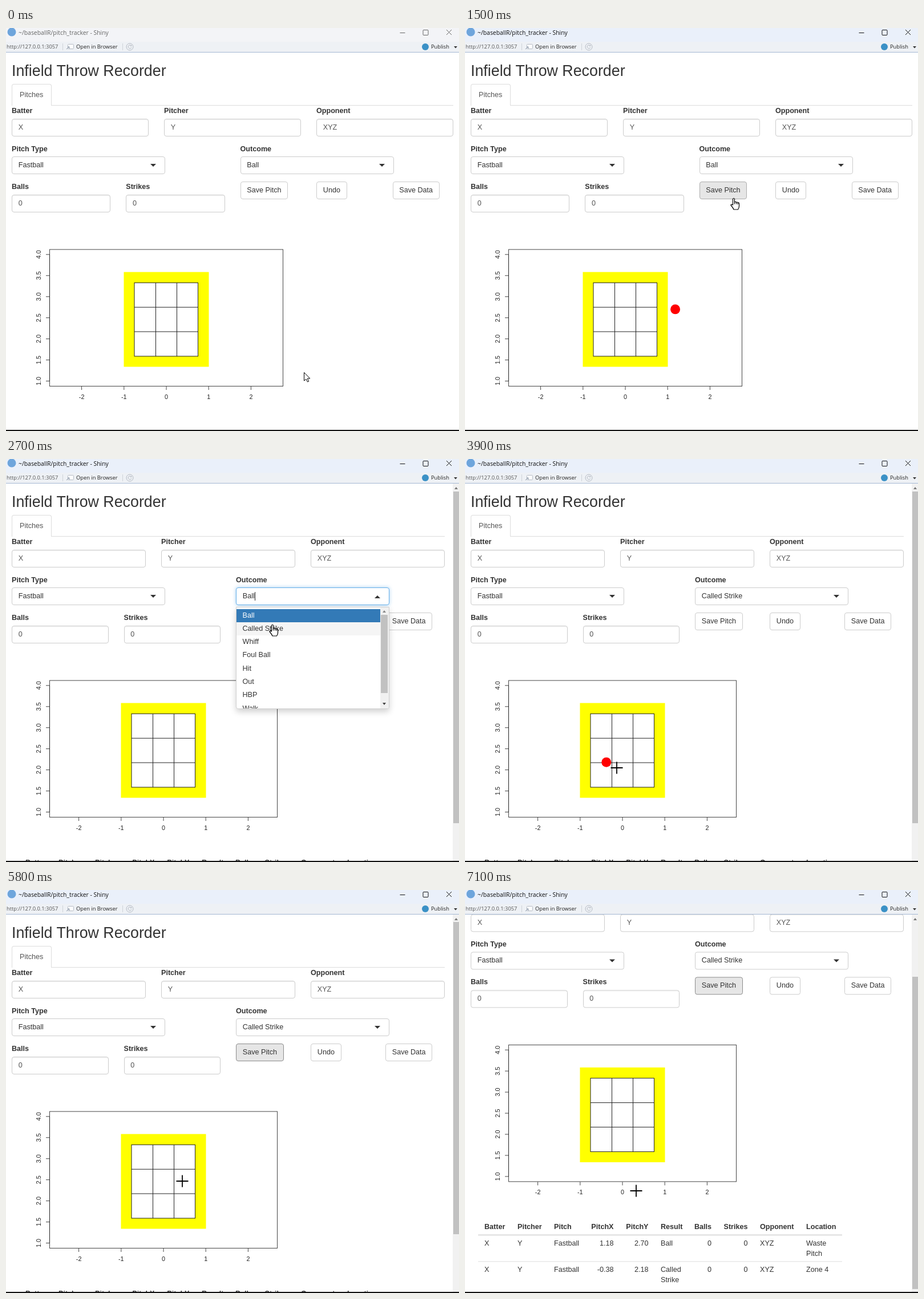
Animation of 794 by 706 pixels, one loop 7.2 s. Source, as an HTML page:

```html
<!DOCTYPE html>
<html lang="en">
<head>
<meta charset="utf-8">
<title>Pitch tracker</title>
<style>
  html, body { margin: 0; width: 100%; height: 100%; overflow: hidden; background: #fff; }
  #stage { position: relative; width: 794px; height: 706px; overflow: hidden; background: #fff; --w: 801px;
    font: 12.6px/18px "Liberation Sans", Arial, sans-serif; color: #333; }
  #stage.narrow { --w: 786px; }
  #stage div, #stage span, #stage svg { position: absolute; box-sizing: border-box; white-space: pre; }
  #stage svg { overflow: visible; }

  .bar { left: 0; width: 794px; font-family: "Open Sans", "Noto Sans", sans-serif; }
  #title { top: 0; height: 24px; background: #f3f4f7; color: #666; font-size: 10.4px; line-height: 16px; }
  .active #title { background: #eaf0fa; color: #111; }
  #tools { top: 24px; height: 19px; background: #eef1f5; border-bottom: 1px solid #a5b8d3;
    color: #222; font-size: 9.3px; line-height: 18px; }
  #view { left: 0; top: 43px; width: 794px; height: 661px; overflow: hidden; }
  #page { left: 0; top: -43px; width: 794px; height: 900px; }
  #floor { left: 0; top: 704px; width: 794px; height: 2px; background: #111; }

  #heading { left: 10px; top: 60px; font-size: 26.8px; line-height: 30px; }
  #tabline { left: 10px; top: 135px; width: calc(var(--w) - 27px); height: 1px; background: #ddd; }
  #tab { left: 10px; top: 98px; width: 70px; height: 38px; border: 1px solid #ddd; border-bottom: 0;
    border-radius: 4px 4px 0 0; background: #fff; color: #555; padding-left: 13px; line-height: 37px; }
  .col { left: calc(10px + var(--w) * var(--at)); }
  .label, .head { font-weight: bold; }
  .input, .select, .button { height: 31px; border: 1px solid #ccc; border-radius: 4px; padding: 0 10.8px; line-height: 29px; }
  .input { width: calc(var(--w) * var(--span) - 27px); color: #555; box-shadow: inset 0 1px 1px rgba(0,0,0,.06); }
  .select { width: 269px; background: #fff; }
  .select svg { right: 15px; top: 12px; }
  .select.open { border-color: #66afe9; box-shadow: 0 0 6px rgba(102,175,233,.6); }
  .select.open svg { transform: scaleY(-1); }
  .open #picked { border-right: 1px solid #222; line-height: 15px; top: 7px; }
  .button { top: 269px; background: #fff; }
  .button.hover { background: #e6e6e6; border-color: #adadad; }
  .button.focus { background: #e6e6e6; border-color: #8c8c8c; }
  .button.down { background: #d4d4d4; border-color: #8c8c8c; outline: 1px dashed #e0702a; outline-offset: -3px;
    box-shadow: inset 0 0 0 1px #d8c860, inset 0 3px 5px rgba(0,0,0,.12); }

  #list { left: 403px; top: 259px; width: 269px; height: 179px; overflow: hidden; z-index: 1; background: #fff;
    border: 1px solid #d0d0d0; border-radius: 0 0 4px 4px; box-shadow: 0 5px 11px rgba(0,0,0,.18); }
  .item { left: 0; width: 252px; height: 23.3px; padding-left: 10.5px; line-height: 23px; }
  .item.on { background: #337ab7; color: #fff; }
  .item.hover { background: #f5f5f5; }
  #listbar { left: 252px; top: 0; width: 15px; height: 178px; background: #f1f1f1; }
  #listthumb { left: 1px; top: 13px; width: 12px; height: 137px; background: #c1c1c1; }

  #table { left: 0; top: 0; }
  #table .right { transform: translateX(-100%); }
  .rule { left: 23px; width: 638px; background: #ddd; }
  #scroll { left: 783px; top: 0; width: 11px; height: 661px; background: #f1f1f1; }
  #thumb { left: 1px; width: 10px; background: #c1c1c1; }
  #stage .hide { display: none; }
</style>
</head>
<body>
<div id="stage">
  <div id="view">
    <div id="page">
      <div id="heading">Infield Throw Recorder</div>
      <div id="tabline"></div>
      <div id="tab">Pitches</div>
      <svg id="plot" width="520" height="680" style="left:0;top:0" font-size="10.8" text-anchor="middle" fill="none">
        <rect id="frame" x="76.5" y="388" height="239.5" stroke="#444"/>
        <g id="axes"></g>
      </svg>
      <div id="table"></div>
      <div id="list"></div>
    </div>
    <div id="scroll">
      <svg width="11" height="14" style="left:0;top:0"><path d="M3 10l3-4 3 4z" fill="#777"/></svg>
      <div id="thumb"></div>
    </div>
  </div>
  <div id="title" class="bar">
    <svg width="794" height="24" style="left:0;top:0" fill="none" stroke="currentColor">
      <circle cx="10" cy="7" r="7.5" fill="#6ea5dc" stroke="none"/>
      <path d="M690.5 8.5h9M732 3.5h7q1 0 1 1v7q0 1-1 1h-7q-1 0-1-1v-7q0-1 1-1zM772 3l9 9m0-9l-9 9"/>
    </svg>
    <span style="left:22px;top:0">~/baseballR/pitch_tracker - Shiny</span>
  </div>
  <div id="tools" class="bar">
    <svg width="794" height="18" style="left:0;top:0" fill="none" stroke="#b5bbc4">
      <path d="M99.5 3v12M204.5 3v12" stroke="#cfd4da"/>
      <rect x="108.5" y="4.5" width="10" height="8" rx="1" fill="#fff"/>
      <path d="M106 13l5-4m-3 0h3v3" stroke="#8a97a8"/>
      <circle cx="217" cy="9" r="6"/><path d="M219.5 7a3 3 0 1 0 .5 3m0-4.5v2h-2"/>
      <circle cx="735" cy="9" r="6" fill="#3b91c6" stroke="none"/>
      <path d="M785 8h6l-3 3.5z" fill="#333" stroke="none"/>
    </svg>
    <span style="left:1px;top:0;color:#555">http://127.0.0.1:3057</span>
    <span style="left:123px;top:0">Open in Browser</span>
    <span style="left:745px;top:0">Publish</span>
  </div>
  <div id="floor"></div>
  <svg id="cursor" width="24" height="24" style="left:0;top:0">
    <path id="arrow" d="M.5.5v14.5l3.5-3 2.5 5 2.2-1-2.4-5h4.5z" fill="#fff" stroke="#000"/>
    <path id="cross" d="M-10.5 0h21M0-10.5v21" stroke="#000" stroke-width="1.8"/>
    <path id="hand" d="M-1.5 12V1.5q1.5-2.5 3 0V7q1.5-1.2 3 .3 1.5-.8 2.7.6 2-.5 2.3 1.6V14q0 3-2 6H0q-1-3-5-7.5 0-2.5 3.5-.5zM1.5 7v3.5M4.5 7.5v3M7.2 8v3" fill="#fff" stroke="#000" stroke-width="1.2" stroke-linejoin="round"/>
  </svg>
</div>
<script>
const $ = id => document.getElementById(id);
const stage = $('stage'), page = $('page');

function add(parent, cls, text, style) {
  const el = document.createElement('div');
  el.className = cls;
  el.textContent = text;
  for (const k in style) el.style.setProperty(k, style[k]);
  return parent.appendChild(el);
}
const label = (text, at, y) => add(page, 'col label', text, { '--at': at, top: y + 'px' });

function input(name, value, at, y, span) {
  label(name, at, y);
  add(page, 'col input', value, { '--at': at, '--span': span, top: y + 22.5 + 'px' });
}
function select(name, at) {
  label(name, at, 202.5);
  const el = add(page, 'col select', '', { '--at': at, top: '225px' });
  el.innerHTML = '<span>Fastball</span><svg width="10" height="6"><path d="M0 0h10l-5 5z" fill="#333"/></svg>';
  return el;
}
const button = (text, at) => add(page, 'col button', text, { '--at': at });

['Batter|X', 'Pitcher|Y', 'Opponent|XYZ'].forEach((s, i) => input(...s.split('|'), i / 3, 136, 1 / 3));
input('Balls', '0', 0, 269, 1 / 4);
input('Strikes', '0', 1 / 4, 269, 1 / 4);
select('Pitch Type', 0);
const outcome = select('Outcome', 1 / 2);
const picked = outcome.firstChild;
picked.id = 'picked';
const save = button('Save Pitch', 1 / 2);
button('Undo', 2 / 3);
button('Save Data', 5 / 6);

// Outcome list
const list = $('list');
const items = ['Ball', 'Called Strike', 'Whiff', 'Foul Ball', 'Hit', 'Out', 'HBP', 'Walk'].map((s, i) =>
  add(list, 'item' + (i ? '' : ' on'), s, { top: 2.5 + i * 23.3 + 'px' }));
list.insertAdjacentHTML('beforeend', '<div id="listbar"><div id="listthumb"></div>' +
  '<svg width="15" height="178" style="left:0;top:0"><path d="M4 9l3-4 3 4z" fill="#888"/>' +
  '<path d="M4 167l3 4 3-4z" fill="#444"/></svg></div>');

// Strike zone plot: pixels per unit across and up
const px = v => 281 + v * 74.2, py = v => 618.5 - (v - 1) * 73.9;
let art = '<rect x="206.5" y="427.5" width="149" height="166" fill="#ff0"/>' +
  '<rect x="225" y="446.3" width="111.5" height="128.7" fill="#fff" stroke="#222"/>' +
  '<path d="M262.5 446.3V575M299.5 446.3V575M225 489.2h111.5M225 532h111.5" stroke="#222"/>';
for (let v = -2; v <= 2; v++)
  art += `<path d="M${px(v)} 628v6" stroke="#444"/><text x="${px(v)}" y="650" fill="#222">${v}</text>`;
$('axes').innerHTML = art + '<circle id="dot" r="8.5" fill="#f00"/>';
let side = '';
for (let v = 1; v <= 4; v += .5)
  side += `<path d="M70 ${py(v)}h6" stroke="#444"/>` +
    `<text transform="translate(61 ${py(v)}) rotate(-90)" fill="#222">${v.toFixed(1)}</text>`;
$('plot').insertAdjacentHTML('beforeend', `<g>${side}<path d="M76.5 ${py(1)}V${py(4)}" stroke="#222"/></g>`);

// Saved pitches; a negative column is a right edge
const table = $('table');
const cols = [34, 92, 156, -260.5, -321.5, 343, -432, -495.5, 517, 598];
const row = (cells, y, cls = '') => cells.split('|').map((s, i) =>
  add(table, cls + (cols[i] < 0 ? ' right' : ''), s, { top: y - 9 + 'px', left: Math.abs(cols[i]) + 'px' }));
const rule = (y, height) => add(table, 'rule', '', { top: y + 'px', height: height + 'px' });

row('Batter|Pitcher|Pitch|PitchX|PitchY|Result|Balls|Strikes|Opponent|Location', 706.6, 'head');
rule(720, 2);
row('X|Y|Fastball|1.18|2.70|Ball|0|0|XYZ|Waste\nPitch', 735.6);
const second = [rule(767, 1), ...row('X|Y|Fastball|-0.38|2.18|Called\nStrike|0|0|XYZ|Zone 4', 781.6)];

// Motion: [ms, value...]
const path = [[0, 522, 603], [500, 368, 493], [900, 368, 493], [1400, 471, 298], [1700, 471, 298],
  [2200, 540, 243], [2400, 540, 243], [2700, 467, 290], [2900, 467, 290], [3500, 247, 531], [3700, 247, 531],
  [3900, 266, 541], [4000, 266, 541], [4700, 454, 283], [5100, 454, 283], [5900, 302, 520], [6300, 302, 520],
  [6700, 300, 527]];
const wheel = [[6200, 0], [6300, 30.6], [6500, 90], [6700, 116.6]];

function at(keys, t, ease) {
  const i = keys.findIndex(k => k[0] > t);
  if (i < 0) return keys[keys.length - 1].slice(1);
  if (!i) return keys[0].slice(1);
  const a = keys[i - 1], b = keys[i], u = ease((t - a[0]) / (b[0] - a[0]));
  return a.slice(1).map((v, n) => v + (b[n + 1] - v) * u);
}
const smooth = u => u * u * (3 - 2 * u), linear = u => u;
const show = (el, on) => el.classList.toggle('hide', !on);

function draw(t) {
  const [x, y] = at(path, t, smooth);
  const [scroll] = at(wheel, t, linear);
  const narrow = t >= 1800, open = t >= 2400 && t < 2900, full = t >= 5100;
  const within = (l, r, top, bottom) => x >= l && x <= r && y >= top && y <= bottom;

  stage.classList.toggle('active', t >= 700);
  stage.classList.toggle('narrow', narrow);
  page.style.transform = `translateY(${-scroll}px)`;

  const left = narrow ? 403 : 411;
  const overSave = !open && within(left, left + 83, 269 - scroll, 299 - scroll);
  save.classList.toggle('hover', overSave);
  save.classList.toggle('focus', t >= 1700 && t < 2400 || t >= 5000);
  save.classList.toggle('down', t >= 4900 && t < 5000);

  outcome.classList.toggle('open', open);
  picked.textContent = t < 2900 ? 'Ball' : 'Called Strike';
  show(list, open);
  items[1].classList.toggle('hover', open && y > 285);

  $('frame').setAttribute('width', narrow ? 399 : 409);
  $('axes').setAttribute('transform', `translate(${narrow ? -5 : 0} 0)`);
  const first = t >= 800 && t < 1800;
  const dot = $('dot');
  show(dot, first || t >= 3700 && t < 5100);
  dot.setAttribute('cx', px(first ? 1.18 : -.38));
  dot.setAttribute('cy', py(first ? 2.7 : 2.18));

  show(table, narrow);
  second.forEach(el => show(el, full));
  show($('scroll'), narrow);
  $('thumb').style.top = (full ? 13 + scroll * .826 : 14) + 'px';
  $('thumb').style.height = (full ? 547 : 581) + 'px';

  const inPlot = within(10, narrow ? 507 : 517, 335 - scroll, 695 - scroll) && !open;
  const onLink = overSave || open || within(left, left + 268, 225, 255);
  show($('cross'), inPlot);
  show($('hand'), !inPlot && onLink);
  show($('arrow'), !inPlot && !onLink);
  $('cursor').style.transform = `translate(${Math.round(x)}px, ${Math.round(y)}px)`;
}

const start = performance.now();
function tick() {
  const t = (performance.now() - start) % 7200;
  draw(Math.floor(t / 100) * 100);
  requestAnimationFrame(tick);
}
draw(0);
requestAnimationFrame(tick);
</script>
</body>
</html>
```
